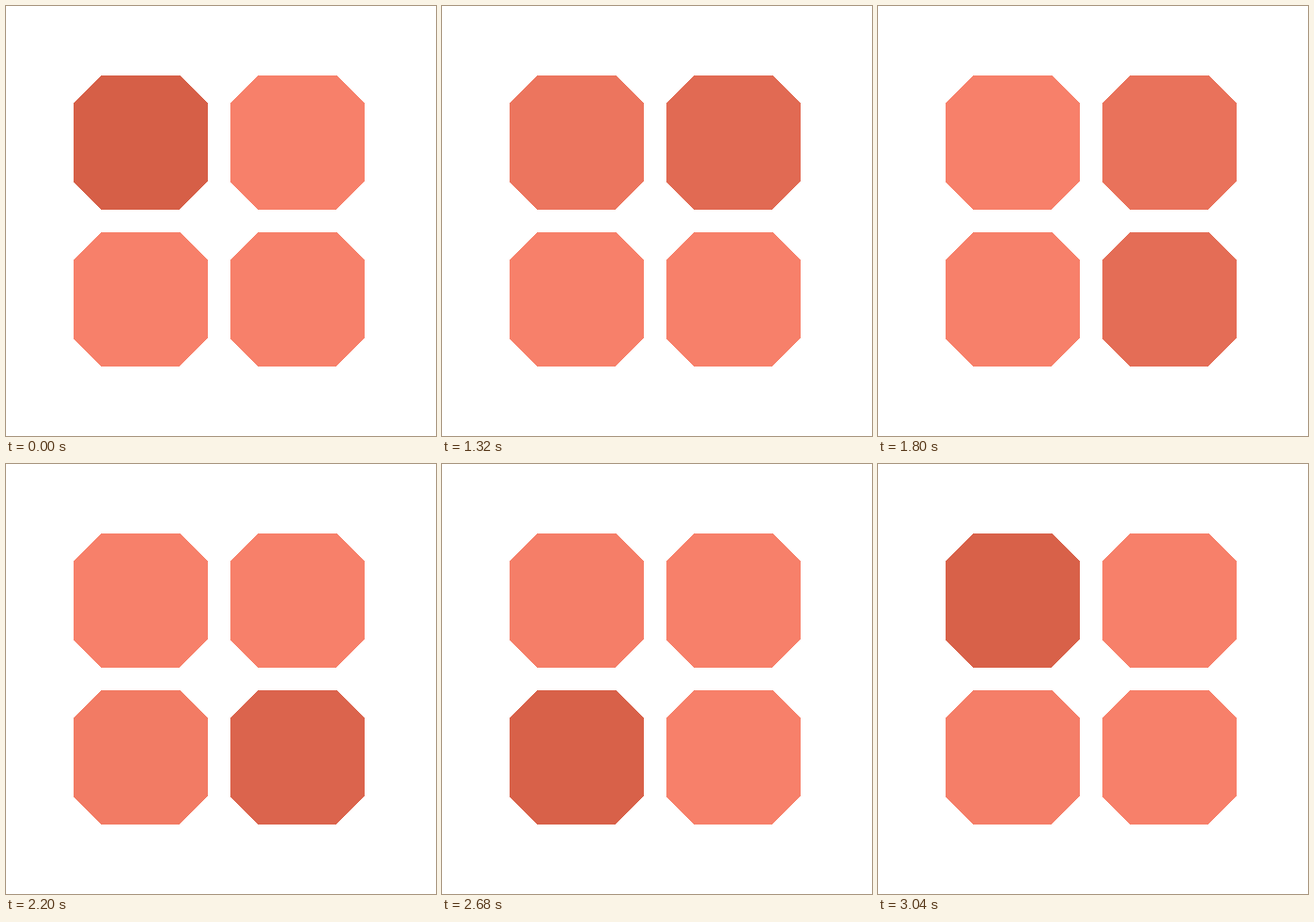
Animation, 458 px wide and 458 px high, one loop 4800 ms. Source, as an HTML page:

```html
<!DOCTYPE html>
<html lang="en">
<head>
<meta charset="utf-8">
<title>Four tiles</title>
<style>
  html, body { margin: 0; width: 100%; height: 100%; overflow: hidden; background: #fff; }
  svg { display: block; width: 100%; height: 100%; }
</style>
</head>
<body>
<svg viewBox="0 0 458 458" shape-rendering="crispEdges">
  <defs>
    <!-- half-pixel corners keep the diagonals off pixel centres -->
    <path id="tile" d="M29.5 0H113.5L143 29.5V112.5L112.5 143H29.5L0 113.5V29.5Z"/>
  </defs>
  <!-- clockwise from top left -->
  <use href="#tile" x="72" y="74"/>
  <use href="#tile" x="239" y="74"/>
  <use href="#tile" x="239" y="241"/>
  <use href="#tile" x="72" y="241"/>
</svg>
<script>
  const LOOP = 4800;
  const START = 1147;   // first hand-over
  const PERIOD = 505;   // from one hand-over to the next
  const FADE = 260;     // length of a hand-over
  const LAST = 3.95;    // where the shade rests, in tiles travelled
  const LIGHT = [247, 128, 106];
  const DARK = [214, 95, 71];

  // moments at which the picture is repainted; it holds in between
  const PAINTS = [0, 1160, 1320, 1500, 1680, 1800, 1940, 2200, 2320, 2500, 2680, 2800, 2940, LOOP];

  const clamp = (v, lo, hi) => Math.min(Math.max(v, lo), hi);

  // how many tiles the shade has travelled at time t
  const travel = t => {
    const leg = clamp(Math.floor((t - START) / PERIOD), 0, 3);
    const part = clamp((t - START - leg * PERIOD) / FADE, 0, 1);
    return Math.min(leg + part, LAST);
  };

  // 1 when the shade is on the tile, 0 when a whole tile away
  const shade = (tile, t) => {
    const gap = Math.abs((travel(t) - tile + 6) % 4 - 2);
    return Math.max(0, 1 - gap);
  };

  const tint = k =>
    `rgb(${LIGHT.map((c, i) => Math.round(c + (DARK[i] - c) * k)).join(",")})`;

  document.querySelectorAll("use").forEach((el, tile) => {
    const frames = PAINTS.map(t => ({
      offset: t / LOOP,
      fill: tint(shade(tile, t)),
      easing: "steps(1, end)"
    }));
    el.animate(frames, { duration: LOOP, iterations: Infinity });
  });
</script>
</body>
</html>
```
